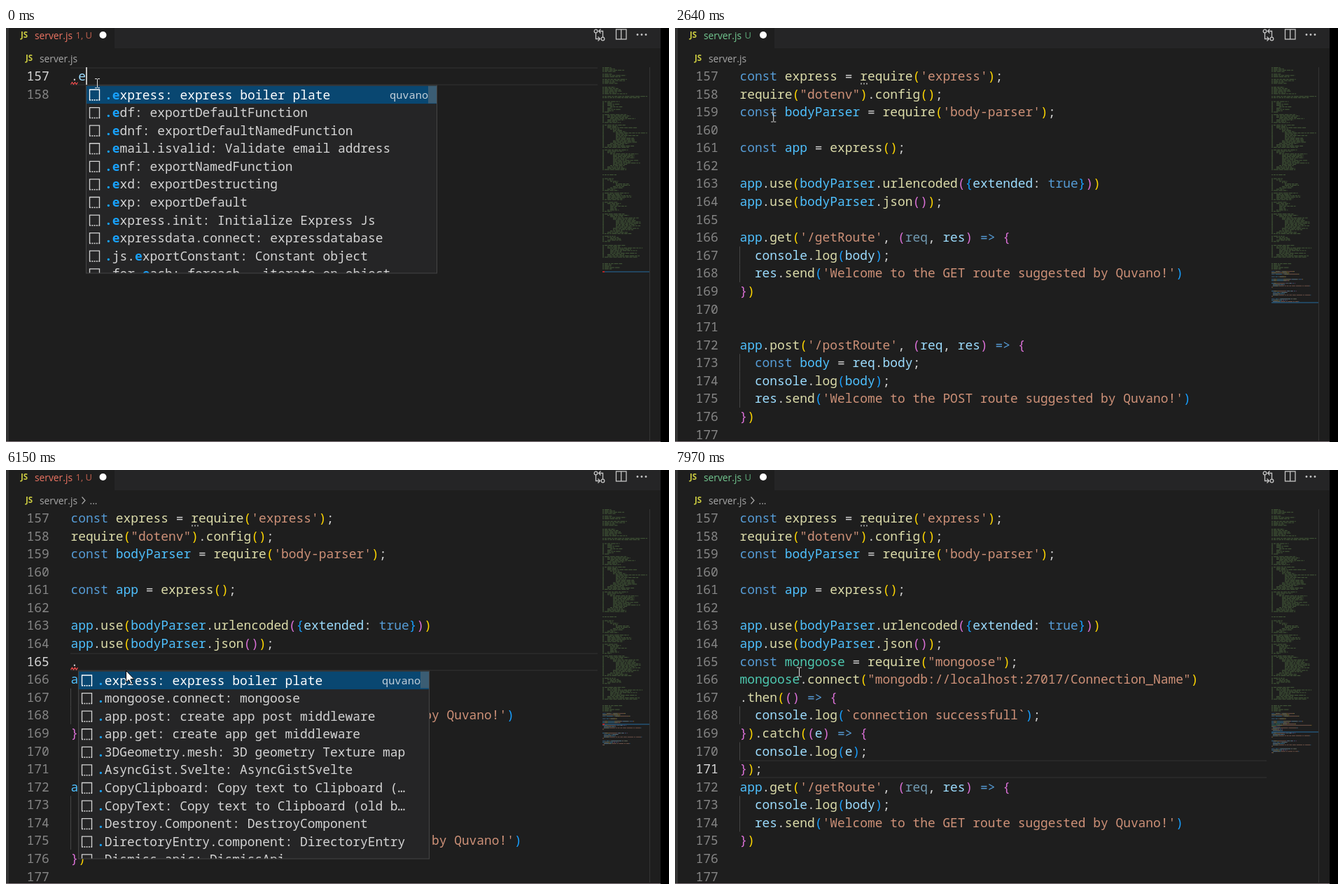
Animation of 947 by 591 pixels, one loop 8000 ms. Source, as an HTML page with a canvas:

```html
<!DOCTYPE html>
<html lang="en">
<head>
<meta charset="utf-8">
<title>Editor snippets</title>
<style>
  html, body { margin: 0; width: 100%; height: 100%; overflow: hidden; background: #1e1e1e; }
  canvas { display: block; }
</style>
</head>
<body>
<canvas id="stage" width="947" height="591"></canvas>
<script>
const ctx = document.getElementById('stage').getContext('2d');
const LOOP = 8000, FONT = 17.9, CHAR = FONT * 0.6, ROW = 25.58, LEFT = 92.4, TOP = 56, FIRST = 157;
const MAP_X = 852, MAP_ROW = 1.866, MAP_CHAR = 0.94;
const MONO = '"Noto Sans Mono", monospace', UI = '"Open Sans", sans-serif';
const BRACKETS = ['#ffd700', '#da70d6', '#179fff'];

const setup = `const express = require('express');
require("dotenv").config();
const bodyParser = require('body-parser');

const app = express();

app.use(bodyParser.urlencoded({extended: true}))
app.use(bodyParser.json());`.split('\n');
const routes = `app.get('/getRoute', (req, res) => {
  console.log(body);
  res.send('Welcome to the GET route suggested by Quvano!')
})


app.post('/postRoute', (req, res) => {
  const body = req.body;
  console.log(body);
  res.send('Welcome to the POST route suggested by Quvano!')
})

const port = process.env.PORT || 3000;
app.listen(port, () => {
  console.log('Server is running on port')
});`.split('\n');
const connection = `const mongoose = require("mongoose");
mongoose.connect("mongodb://localhost:27017/Connection_Name")
.then(() => {
  console.log(\`connection successfull\`);
}).catch((e) => {
  console.log(e);
});`.split('\n');

// Square brackets mark the matched letters.
const menuE = `[.e]xpress: express boiler plate
[.e]df: exportDefaultFunction
[.e]dnf: exportDefaultNamedFunction
[.e]mail.isvalid: Validate email address
[.e]nf: exportNamedFunction
[.e]xd: exportDestructing
[.e]xp: exportDefault
[.e]xpress.init: Initialize Express Js
[.e]xpressdata.connect: expressdatabase
[.]js.[e]xportConstant: Constant object
[.]for.[e]ach: foreach - iterate on object`.split('\n');
const menuEx = `[.ex]press: express boiler plate
[.ex]d: exportDestructing
[.ex]p: exportDefault
[.ex]press.init: Initialize Express Js
[.ex]pressdata.connect: expressdatabase
.js[.ex]portConstant: Constant object
[.e]df: e[x]portDefaultFunction
[.e]nf: e[x]portNamedFunction
[.e]dnf: e[x]portDefaultNamedFunction
[.]n[ex]tjs.component.cardComponent: Nextjs …
[.]n[ex]tjs.component.timer: Nextjs Timer Co…`.split('\n');
const menuDot = `[.]express: express boiler plate
[.]mongoose.connect: mongoose
[.]app.post: create app post middleware
[.]app.get: create app get middleware
[.]3DGeometry.mesh: 3D geometry Texture map
[.]AsyncGist.Svelte: AsyncGistSvelte
[.]CopyClipboard: Copy text to Clipboard (…
[.]CopyText: Copy text to Clipboard (old b…
[.]Destroy.Component: DestroyComponent
[.]DirectoryEntry.component: DirectoryEntry
[.]Dismiss.apic: DismissApi`.split('\n');

const within = (t, ...spans) => spans.some(([a, b]) => t >= a && t < b);

function rect(x, y, w, h, color) {
  ctx.fillStyle = color;
  ctx.fillRect(x, y, w, h);
}

function label(text, x, y, size, color, weight = 400) {
  ctx.font = `${weight} ${size}px ${UI}`;
  ctx.fillStyle = color;
  ctx.fillText(text, x, y);
}

// Monospace text on the editor's character grid.
function mono(text, x, y, color, weight = 500, size = FONT) {
  ctx.font = `${weight} ${size}px ${MONO}`;
  ctx.fillStyle = color;
  [...text].forEach((c, i) => c !== ' ' && ctx.fillText(c, x + i * size * 0.6, y));
}

function line(points, color, width = 1) {
  ctx.beginPath();
  points.forEach(([x, y]) => ctx.lineTo(x, y));
  ctx.strokeStyle = color;
  ctx.lineWidth = width;
  ctx.stroke();
}

function disc(x, y, r, color) {
  ctx.beginPath();
  ctx.arc(x, y, r, 0, 7);
  ctx.fillStyle = color;
  ctx.fill();
}

// Returns a list of [column, text, color] per line.
function highlight(lines, semantic) {
  const constants = new Set();
  let depth = 0;
  return lines.map(text => {
    const tokens = [];
    for (const m of text.matchAll(/'[^']*'|"[^"]*"|`[^`]*`|\w+|=>|[^\s\w]/g)) {
      const s = m[0], before = text.slice(0, m.index), after = text[m.index + s.length];
      let color = '#d4d4d4';
      if (/^['"`]/.test(s)) color = '#ce9178';
      else if (/[([{]/.test(s)) color = BRACKETS[depth++ % 3];
      else if (/[)\]}]/.test(s)) color = BRACKETS[(--depth + 3) % 3];
      else if (/^(const|true|=>)$/.test(s)) color = '#569cd6';
      else if (/^\d/.test(s)) color = '#b5cea8';
      else if (/\w/.test(s)) {
        const declared = before.endsWith('const ');
        if (declared) constants.add(s);
        const known = semantic && constants.has(s) && !before.endsWith('.');
        if (after === '(' || semantic && s === 'express') color = '#dcdcaa';
        else if (semantic && s === 'mongoose') color = '#4ec9b0';
        else if (semantic && s === 'req' && text.includes('app.get')) color = '#729bb3';
        else color = declared || known ? '#4fc1ff' : '#9cdcfe';
      }
      tokens.push([m.index, s, color]);
    }
    return tokens;
  });
}

// Commented-out code above the visible lines: [first line, count, deepest indent, width].
const blocks = [[0, 4, 0, 38], [5, 3, 0, 36], [9, 4, 0, 40], [15, 6, 0, 42], [22, 2, 0, 68],
  [26, 9, 6, 26], [36, 7, 6, 40], [44, 18, 16, 50], [63, 16, 14, 48], [82, 1, 0, 22], [85, 10, 15, 24],
  [96, 6, 4, 44], [103, 8, 8, 30], [112, 16, 18, 44], [129, 5, 7, 22], [136, 10, 8, 56], [150, 5, 0, 36]];
const comments = [];
let seed = 7;
const random = () => (seed = (seed * 16807) % 2147483647) / 2147483647;
for (const [start, count, deepest, width] of blocks) {
  for (let i = 0; i < count; i++) {
    const indent = 3 + 4 * Math.round(deepest / 4 * Math.sin(Math.PI * i / Math.max(1, count - 1)));
    const length = Math.min(width * (0.25 + 0.65 * random()), 67 - indent);
    const y = TOP + (start + i) * MAP_ROW;
    comments.push([MAP_X, y, 2]);
    for (let x = indent; x < indent + length;) {
      const word = 2 + random() * 5;
      comments.push([MAP_X + x, y, Math.min(word, indent + length - x)]);
      x += word + 1;
    }
  }
}

function drawMinimap(code, active, error, errorLine) {
  const rowY = n => TOP + (n - 1) * MAP_ROW;
  ctx.globalAlpha = 0.45;
  for (const [x, y, w] of comments) rect(x, y, w, 1.1, '#6a9955');
  code.forEach((tokens, i) => tokens.forEach(([col, s, color]) => {
    for (const word of s.matchAll(/\S+/g)) {
      rect(MAP_X + (col + word.index) * MAP_CHAR, rowY(FIRST + i), word[0].length * MAP_CHAR, 1, color);
    }
  }));
  ctx.globalAlpha = 1;
  rect(MAP_X, Math.round(rowY(active) - 0.5), 67, 2, '#22455f');
  if (error) rect(MAP_X, Math.round(rowY(errorLine) - 0.5), active === errorLine ? 3 : 67, 2, '#b02525');
  rect(919, TOP, 1, 533, '#343434');
}

function drawHeader(t, error) {
  const tint = error ? '#ef7563' : '#73c991', edge = error ? 155 : 142;
  rect(edge, 0, 935 - edge, 29, '#252526');
  label('JS', 21, 14, 11.5, '#cbcb41', 700);
  label('server.js', 41, 15.5, 13.8, tint);
  label(error ? '1, U' : 'U', 99.5, 15, 13, error ? '#c4614f' : '#5ba577');
  disc(error ? 138.5 : 126, 10, 5, '#fff');
  label('JS', 28, 46.5, 11.5, '#cbcb41', 700);
  label('server.js', 48, 48.5, 13.8, '#a9a9a9');
  if (t >= 3990) {
    line([[108.5, 38.5], [113, 43.5], [108.5, 48.5]], '#a9a9a9', 1.2);
    label('...', 119.5, 48.5, 13.8, '#a9a9a9');
  }
  const ink = '#c5c5c5';
  for (const [x, y] of [[842.5, 4.5], [852.5, 15.5]]) {
    ctx.beginPath();
    ctx.arc(x, y, 2.3, 0, 7);
    ctx.strokeStyle = ink;
    ctx.lineWidth = 1.3;
    ctx.stroke();
  }
  line([[842.5, 7], [842.5, 15.5], [848, 15.5]], ink, 1.3);
  line([[845.5, 12.5], [848.5, 15.5], [845.5, 18.5]], ink, 1.3);
  line([[852.5, 13], [852.5, 4.5], [847, 4.5]], ink, 1.3);
  line([[849.5, 1.5], [846.5, 4.5], [849.5, 7.5]], ink, 1.3);
  ctx.strokeRect(871.5, 2, 14.5, 14);
  line([[878.7, 2], [878.7, 16]], ink, 1.3);
  for (const x of [902, 908, 914]) disc(x, 9.5, 1.4, ink);
}

function squiggle(x, y) {
  line([0, 2, 4, 6, 8, 10].map((d, i) => [x + d, y + (i % 2 ? 0 : 3)]), '#f14c4c', 1.2);
}

function drawEditor(t, lines, code, active, error, errorLine) {
  const rowY = n => TOP + (n - FIRST) * ROW;
  if (active < 178) {
    const y = Math.round(rowY(active));
    rect(92, y, 753, 2, '#282828');
    rect(92, y + 24, 753, 2, '#282828');
  }
  for (let i = 0; i < Math.min(21, lines.length); i++) {
    const n = FIRST + i, y = rowY(n);
    mono(String(n), 29.5, y + 19, n === active ? '#d8d8d8' : '#858585');
    if (lines[i].startsWith(' ')) rect(92, y, 1, ROW, '#454545');
    for (const [col, s, color] of code[i]) mono(s, LEFT + col * CHAR, y + 19, color);
  }
  if (error) squiggle(92.5, rowY(errorLine) + 21.5);
  if (t >= 2150) for (const x of [265, 269, 273]) rect(x, 78.5, 2, 2, '#9a9a9a');
  if (within(t, [0, 810], [1350, 1630], [3550, 3990], [4510, 5090], [5590, 6150], [6680, 7720])) {
    rect(Math.round(LEFT + lines[active - FIRST].length * CHAR), Math.round(rowY(active)), 2, 25, '#c4c4c2');
  }
}

function drawMenu(items, x, y, selected, slider) {
  const width = 502, height = 269;
  rect(x, y, width, height, '#454545');
  rect(x + 1, y + 1, width - 2, height - 2, '#252526');
  ctx.save();
  ctx.beginPath();
  ctx.rect(x + 1, y + 1, width - 2, height - 2);
  ctx.clip();
  items.forEach((item, i) => {
    const top = y + 1 + i * ROW, ink = i === selected ? '#fff' : '#d4d4d4';
    if (i === selected) {
      rect(x + 1, top, width - 2, ROW, '#094771');
      mono('quvano', x + 434, top + 18, '#c3d0da', 400, 15.3);
    }
    line([[x + 5.5, top + 20], [x + 5.5, top + 5.5], [x + 19.5, top + 5.5], [x + 19.5, top + 20]], ink, 1.3);
    for (let d = 0; d < 5; d++) rect(x + 5 + d * 3.3, top + 19.5, 2, 1.6, ink);
    let col = 0;
    item.split(/[[\]]/).forEach((part, k) => {
      mono(part, x + 27 + col * CHAR, top + 19, k % 2 ? '#18a3ff' : ink, k % 2 ? 700 : 500);
      col += part.length;
    });
  });
  rect(x + 489, y + 1, 12, slider, 'rgba(121,121,121,.45)');
  ctx.restore();
}

function pointerAt(t) {
  if (t < 2400) return [130.5, 79];
  if (t < 3160) {
    const p = Math.min(6, Math.floor((t - 2400) / 122) + 1) / 6, ease = p * p * (3 - 2 * p);
    return [130.5 + 39.5 * ease, 79 + 187 * ease];
  }
  if (t < 3280) return [172, 278];
  return t < 7970 ? [173.5, 287] : [177.5, 288.5];
}

function drawPointer(t) {
  if (within(t, [4820, 7330])) {
    const arrow = [[0, 0], [0, 16.5], [4, 13], [6.8, 19], [9.2, 18], [6.5, 12], [11.5, 12]];
    ctx.beginPath();
    arrow.forEach(([dx, dy]) => ctx.lineTo(171.5 + dx, 286.5 + dy));
    ctx.closePath();
    ctx.fillStyle = '#fff';
    ctx.fill();
    ctx.strokeStyle = '#000';
    ctx.lineWidth = 1;
    ctx.stroke();
    return;
  }
  const [x, y] = pointerAt(t), ink = '#dedede';
  line([[x, y - 6], [x, y + 6]], ink);
  for (const end of [-6.5, 6.5]) {
    line([[x - 3.5, y + end], [x - 0.5, y + end]], ink);
    line([[x + 0.5, y + end], [x + 3.5, y + end]], ink);
  }
}

function draw(t) {
  let lines, active;
  if (t < 1630) {
    lines = [t < 290 ? '.e' : '.ex', ''];
    active = 157;
  } else {
    const middle = t < 4660 ? [''] : t < 7210 ? ['.'] : connection;
    lines = [...setup, ...middle, ...routes];
    active = t < 3550 ? 181 : t < 7210 ? 165 : 171;
  }
  const error = within(t, [0, 2030], [5090, 7590]), errorLine = t < 2030 ? 157 : 165;
  const code = highlight(lines, within(t, [1780, 7210], [7590, LOOP]));

  rect(0, 0, 947, 591, '#1e1e1e');
  drawHeader(t, error);
  drawEditor(t, lines, code, active, error, errorLine);
  drawMinimap(code, active, error, errorLine);
  if (t < 290) drawMenu(menuE, 114, 81.5, 0, 25);
  else if (t < 1630) drawMenu(menuEx, 125, 81.5, 0, 122);
  else if (within(t, [4820, 7210])) drawMenu(menuDot, 103, 286.5, t < 6680 ? 0 : 1, 24);
  drawPointer(t);

  rect(0, 0, 4, 591, '#333');
  rect(0, 590, 935, 1, '#85797f');
  rect(935, 0, 12, 591, '#000');
}

function frame() {
  draw(performance.now() % LOOP);
  requestAnimationFrame(frame);
}
frame();
</script>
</body>
</html>
```
